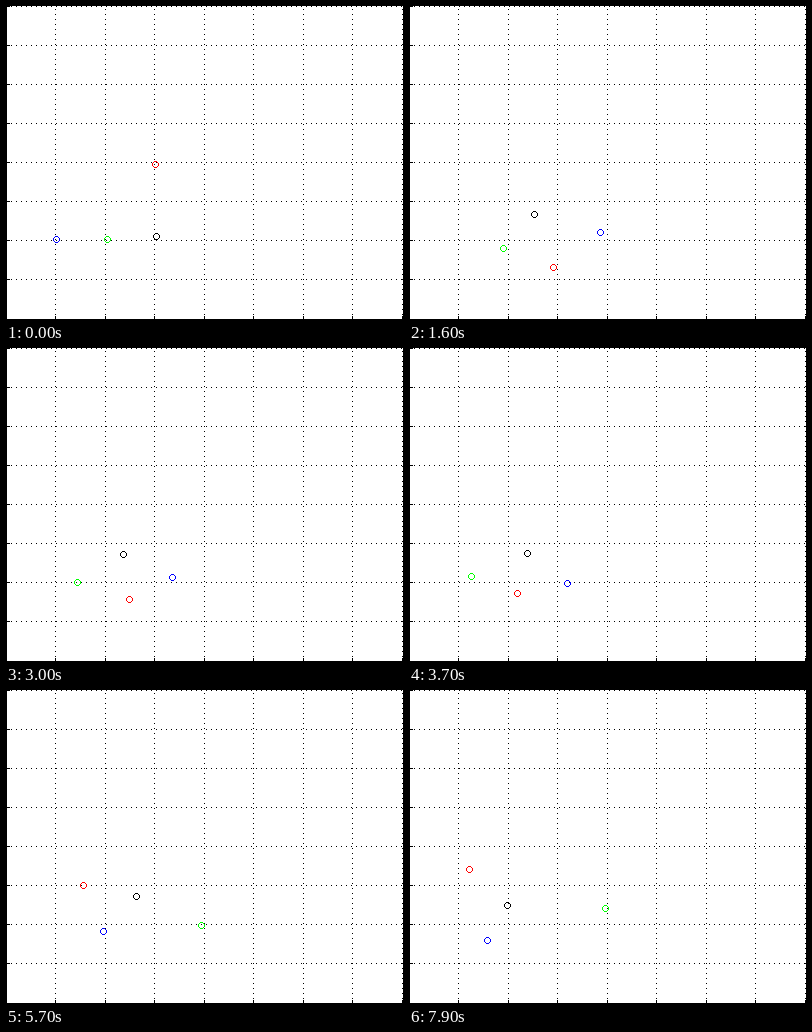
An HTML page with a canvas for the animation above (8000 ms loop, 397 by 314 pixels).

```html
<!DOCTYPE html>
<html lang="en">
<head>
<meta charset="utf-8">
<title>Four moving points</title>
<style>
html, body { margin: 0; width: 100%; height: 100%; overflow: hidden; background: #fff; }
canvas { display: block; width: 397px; height: 314px; image-rendering: pixelated; }
</style>
</head>
<body>
<canvas id="stage" width="397" height="314"></canvas>
<script>
const W = 397, H = 314, STEP = 100, STEPS = 80, DOT_GAP = 5;
const ctx = document.getElementById('stage').getContext('2d');

// A few poses, passed at these steps; the swings between them come from the spline.
const times = [0, 10, 23, 37, 57, 66, 79];
const bodies = [
  { color: '#f00', x: [149, 147, 137, 108, 77, 59, 60], y: [158, 253, 253, 245, 195, 188, 179] },
  { color: '#0f0', x: [101, 92, 94, 62, 195, 191, 196], y: [233, 241, 241, 228, 235, 225, 218] },
  { color: '#00f', x: [50, 188, 171, 158, 97, 97, 78], y: [233, 230, 224, 235, 241, 251, 250] },
  { color: '#000', x: [150, 132, 119, 118, 130, 104, 98], y: [230, 212, 207, 205, 206, 212, 215] }
];

// Cubic Hermite spline whose slopes follow the neighbouring poses.
function spline(values, t) {
  const last = times.length - 1;
  const slope = i => {
    const a = Math.max(i - 1, 0), b = Math.min(i + 1, last);
    return (values[b] - values[a]) / (times[b] - times[a]);
  };
  let i = 0;
  while (i < last - 1 && t >= times[i + 1]) i++;
  const h = times[i + 1] - times[i], u = (t - times[i]) / h, v = 1 - u;
  return Math.round(values[i] * v * v * (1 + 2 * u) + values[i + 1] * u * u * (3 - 2 * u)
    + h * u * v * (slope(i) * v - slope(i + 1) * u));
}

function drawGrid() {
  ctx.fillStyle = '#fff';
  ctx.fillRect(0, 0, W, H);
  ctx.fillStyle = '#000';
  for (let i = 0; i <= 8; i++) {
    const x = Math.floor(i * 49.5), y = Math.floor(i * 39.125);
    for (let d = 0; d < H; d += DOT_GAP) ctx.fillRect(x, H - 1 - d, 1, 1);
    for (let d = 0; d < W; d += DOT_GAP) ctx.fillRect(d, y, 1, 1);
    ctx.fillRect(x, H - 4, 1, 4);
    ctx.fillRect(0, y, 4, 1);
  }
  ctx.fillRect(0, 0, 1, H);
  ctx.fillRect(0, H - 1, W, 1);
}

// Crisp seven-pixel ring.
function drawRing(x, y, color) {
  ctx.fillStyle = color;
  for (const s of [-1, 1]) {
    ctx.fillRect(x - 1, y + 3 * s, 3, 1);
    ctx.fillRect(x + 3 * s, y - 1, 1, 3);
    ctx.fillRect(x - 2, y + 2 * s, 1, 1);
    ctx.fillRect(x + 2, y + 2 * s, 1, 1);
  }
}

let shown = -1;
function frame() {
  const step = Math.floor(performance.now() / STEP) % STEPS;
  if (step !== shown) {
    shown = step;
    drawGrid();
    for (const { color, x, y } of bodies) drawRing(spline(x, step), spline(y, step), color);
  }
  requestAnimationFrame(frame);
}
frame();
</script>
</body>
</html>
```
